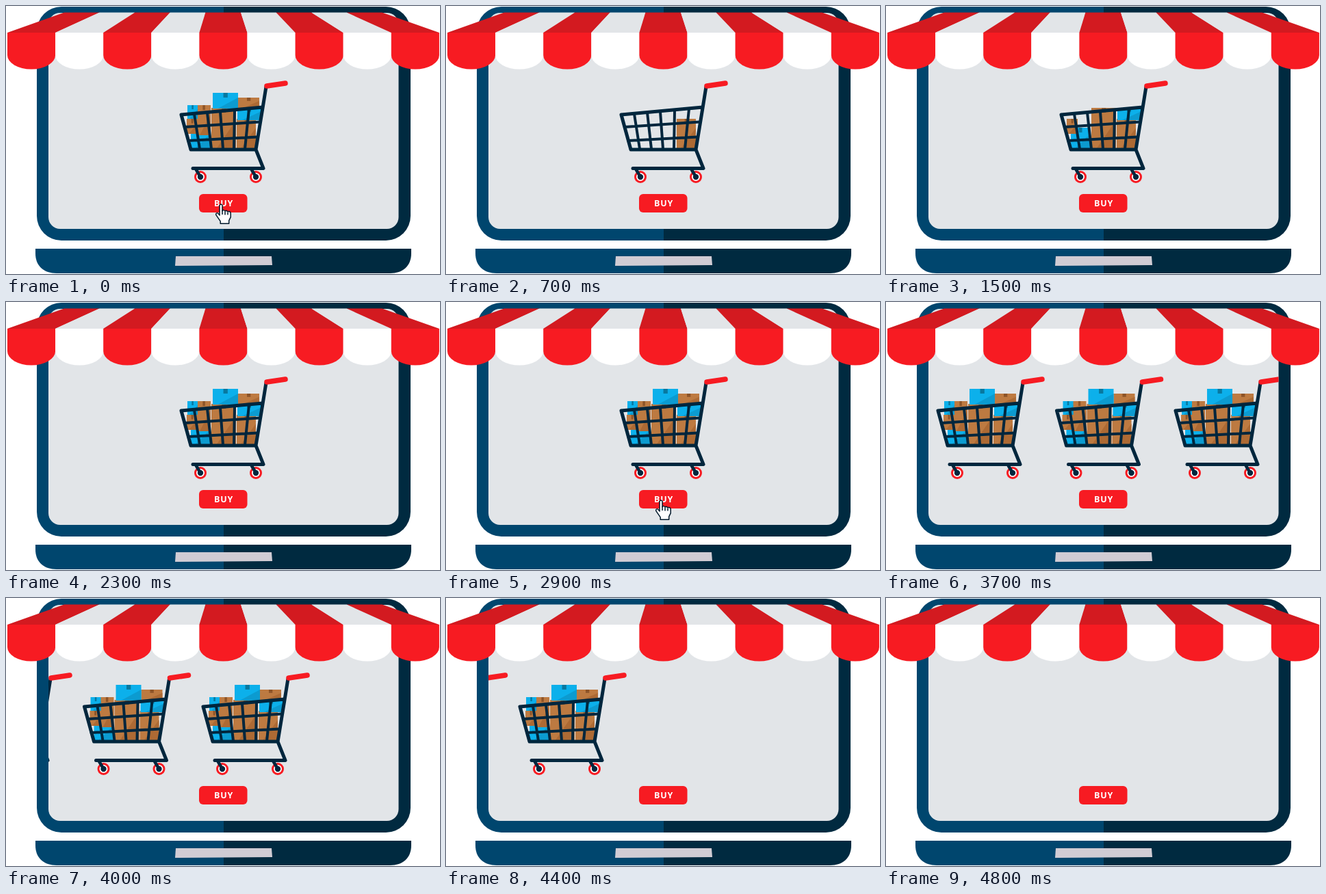
An HTML page that plays this animation: 634 by 392 pixels, repeating every 7.8 s.

```html
<!DOCTYPE html>
<html lang="en">
<head>
<meta charset="utf-8">
<title>Online shop</title>
<style>
  html, body { margin: 0; width: 100%; height: 100%; overflow: hidden; background: #fff; }
  svg { display: block; width: 100%; height: 100%; }
  text { font: 700 12.5px "Open Sans", sans-serif; letter-spacing: .8px; fill: #fff; }
</style>
</head>
<body>
<svg viewBox="0 0 634 392">
  <defs>
    <linearGradient id="body" gradientUnits="userSpaceOnUse" x1="0" x2="634" y1="0" y2="0">
      <stop offset="0" stop-color="#00466e"/>
      <stop offset=".5016" stop-color="#00466e"/>
      <stop offset=".5016" stop-color="#002a40"/>
    </linearGradient>
    <clipPath id="screenClip"><rect x="62" y="10" width="511.5" height="316"/></clipPath>
    <clipPath id="rimClip"><rect x="573.5" y="10" width="17.5" height="316"/></clipPath>

    <g id="cart">
      <g id="boxes"></g>
      <g fill="none" stroke="#00263d" stroke-linecap="round" stroke-linejoin="round">
        <path stroke-width="5" d="M380 118L375 149L365 210H270L256 159L375 148M365 210L376 237.5H273"/>
        <path stroke-width="4" d="M261 177L371 169.5M266 197L368 191.5M275 158L283 209M294 156L300 209M313 154.5L317 209M334 152.5L333 209M355 150.5L349 209"/>
      </g>
      <path d="M381 117L408 113" stroke="#f71b22" stroke-width="7.5" stroke-linecap="round"/>
      <g id="wheel">
        <circle cx="284" cy="250" r="7.5" fill="#fff" stroke="#f71b22" stroke-width="3"/>
        <path d="M277.5 239L283.5 249" stroke="#00263d" stroke-width="4.5"/>
        <circle cx="284" cy="250" r="4.2" fill="#00263d"/>
      </g>
      <use href="#wheel" x="81"/>
    </g>
  </defs>

  <rect x="45" y="1" width="546" height="342" rx="36" fill="url(#body)"/>
  <rect x="62" y="10" width="511.5" height="316" rx="17" fill="#e2e5e8"/>
  <path d="M43 355H592V362C592 380 580 391 561 391H74C55 391 43 380 43 362Z" fill="url(#body)"/>
  <path d="M248 366H388L389 379L247 380Z" fill="#d0ccd4"/>

  <g clip-path="url(#screenClip)" id="carts"></g>
  <g clip-path="url(#rimClip)" id="overhang"></g>
  <g id="awning"></g>

  <rect x="282" y="275" width="70.5" height="27" rx="6" fill="#f71b22"/>
  <text x="318" y="292.5" text-anchor="middle">BUY</text>
  <g id="cursor" stroke="#00182a" stroke-width="1.5" stroke-linejoin="round">
    <path fill="#fff" d="M312 291.5q2-3 4 0v8q2-2 4 .5q2-1.500 4 .8q3.500-1 4.200 2v6l-2.500 5v4.500h-12.500v-3.500l-6.500-9.500q0-3.500 3-2.200l2.300 3z"/>
    <path fill="none" d="M316 299v6M320 300.500v5M324 301.500v4"/>
  </g>
</svg>
<script>
const LOOP = 7800, CART_GAP = 173.5, CART_STEP = 45;
const byId = id => document.getElementById(id);

function add(parent, tag, attrs) {
  const node = document.createElementNS("http://www.w3.org/2000/svg", tag);
  for (const name in attrs) node.setAttribute(name, attrs[name]);
  return parent.appendChild(node);
}

const show = (node, on) => node.setAttribute("visibility", on ? "inherit" : "hidden");

// Awning: slanted stripes above, rounded flaps below.
const edge = i => 2 + i * 70.1, topEdge = i => 85 + i * 51.6;
for (let i = 0; i < 9; i++) {
  const red = i % 2 === 0, l = edge(i), r = edge(i + 1);
  add(byId("awning"), "path", {
    d: `M${topEdge(i)} 9.5H${topEdge(i + 1)}L${r} 39H${l}Z`,
    fill: red ? "#d31a20" : "#e2e5e8"
  });
  add(byId("awning"), "path", {
    d: `M${l} 39H${r}V72A35.05 20.5 0 0 1 ${l} 72Z`,
    fill: red ? "#f71b22" : "#fff"
  });
}

// Boxes in the order they land in the cart.
const BROWN = ["#bd7a41", "#ad6a34", "#8d5428"];
const BLUE = ["#0cb0eb", "#0c9bd0", "#08789f"];

function addBox(x, y, w, h, [face, shade, tape]) {
  const box = add(byId("boxes"), "g", {});
  add(box, "rect", { x, y, width: w, height: h, fill: face });
  add(box, "path", { d: `M${x + w} ${y + h * .3}V${y + h}H${x + w * .2}Z`, fill: shade });
  add(box, "rect", { x: x + w * .42, y, width: w * .17, height: Math.min(7, h * .3), fill: tape });
  return box;
}

const boxes = [
  [337, 165, 28, 44, BROWN],
  [270, 178, 28, 31, BLUE],
  [264, 165, 16, 22, BROWN],
  [338, 149, 34, 18, BLUE],
  [300, 149, 36, 60, BROWN],
  [279, 145, 20, 44, BROWN],
  [265, 145, 15, 20, BLUE],
  [339, 134, 31, 16, BROWN],
  [302, 127, 37, 23, BLUE]
].map(args => addBox(...args));
boxes[8].id = "topBox";

const carts = [0, 1, 2].map(() => add(byId("carts"), "use", { href: "#cart" }));
const overhang = add(byId("overhang"), "use", { href: "#topBox" });

function render(t) {
  const opening = t < 100;
  boxes.forEach((box, i) => show(box, opening || t >= 700 + i * 200));

  const rolling = t >= 3300;
  const shift = rolling ? -CART_STEP * Math.floor((t - 3300) / 100) : 0;
  carts.forEach((cart, i) => {
    cart.setAttribute("x", shift + i * CART_GAP);
    show(cart, t < 4800 && (i === 0 || rolling));
  });
  overhang.setAttribute("x", shift + 2 * CART_GAP);
  show(overhang, rolling && t < 4800);

  const cursorStep = opening ? 4 : Math.min(4, Math.floor((t - 2500) / 100));
  byId("cursor").setAttribute("transform", `translate(${(cursorStep - 4) * 15.5})`);
  show(byId("cursor"), opening || (t >= 2500 && !rolling));
}

const start = performance.now();
function tick() {
  render((performance.now() - start) % LOOP);
  requestAnimationFrame(tick);
}
tick();
</script>
</body>
</html>
```
